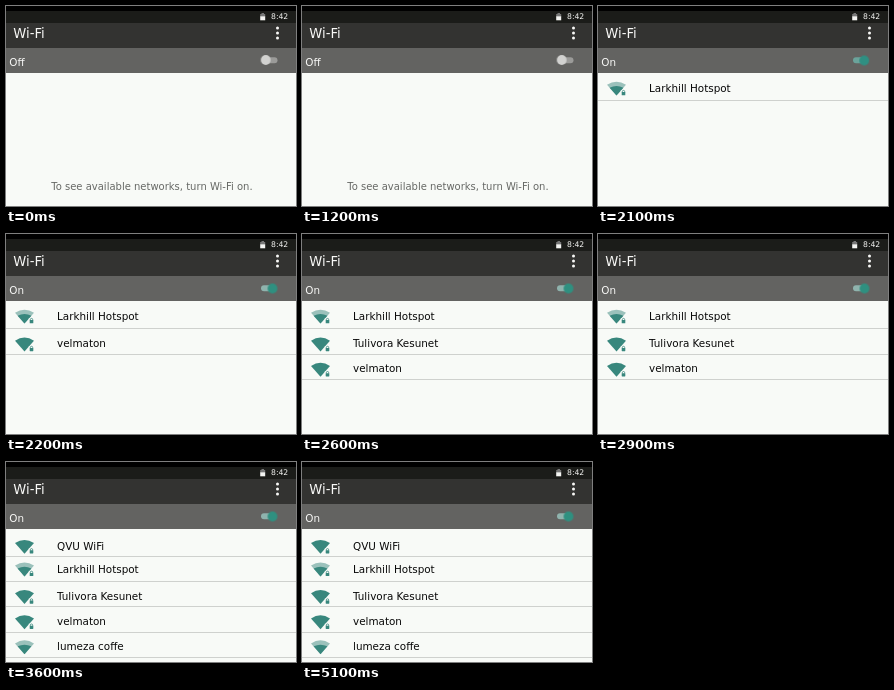
Write an HTML page that moves like this. It is 290 px wide and 200 px high and loops after 6100 ms.

```html
<!DOCTYPE html>
<html lang="en">
<head>
<meta charset="utf-8">
<title>Wi-Fi settings</title>
<style>
  html, body { margin: 0; width: 100%; height: 100%; overflow: hidden; background: #f8faf7; }
  svg { position: absolute; top: 0; left: 0; display: block; }
  text { font-family: "DejaVu Sans", sans-serif; font-size: 10.4px; fill: #080808; }
  .light { fill: #f8f8f6; }

  /* every change is a hard step on one shared 6.1s clock */
  .off, .on, .row, .knob, .track, .rules { animation: 6.1s step-end infinite; }
  .off { animation-name: off; }
  .on { animation-name: on; }
  .knob { animation-name: knob; }
  .track { animation-name: track; }
  .rules { animation-name: rules; }
  .hotspot { animation-name: hotspot; }
  .second { animation-name: second; }
  .pushed { animation-name: pushed; }
  .open { animation-name: open; }
  .top { animation-name: top; }

  .rules {
    --y: 14.4px;
    position: absolute; top: 80px; left: 0; width: 290px; height: 0;
    background: repeating-linear-gradient(#cfd1ce var(--y) calc(var(--y) + 1px),
      transparent calc(var(--y) + 1px) calc(var(--y) + 25.2px));
  }

  @keyframes off { 0% { opacity: 1 } 34.426%, 100% { opacity: 0 } }
  @keyframes on { 0% { opacity: 0 } 34.426%, 100% { opacity: 1 } }
  @keyframes knob {
    0% { transform: translate(259.7px, 54px); fill: #d2d2d0 }
    32.787% { transform: translate(259.7px, 54.2px); fill: #b9d0cb }
    34.426% { transform: translate(266.2px, 54.5px); fill: #2f8f82 }
    36.066%, 100% { transform: translate(266.5px, 54.5px); fill: #2f9080 }
  }
  @keyframes track {
    0% { transform: translateX(5px); fill: #9b9b99 }
    34.426% { transform: none; fill: #6ba39b }
    36.066%, 100% { transform: none; fill: #8fb3ad }
  }
  @keyframes rules {
    0% { height: 0 }
    34.426% { height: 17px }
    36.066% { height: 42px }
    42.623% { height: 67px }
    50.82% { height: 92px }
    59.016%, 100% { height: 117px; --y: 13.95px }
  }
  @keyframes hotspot {
    0% { opacity: 0; transform: translateY(-1.4px) }
    34.426% { opacity: 1; transform: translateY(-1.4px) }
    59.016%, 100% { opacity: 1; transform: translateY(23.4px) }
  }
  @keyframes second {
    0% { opacity: 0; transform: translateY(25.7px) }
    42.623% { opacity: 1; transform: translateY(25.7px) }
    59.016%, 100% { opacity: 1; transform: translateY(50.2px) }
  }
  @keyframes pushed {
    0% { opacity: 0; transform: translateY(25.7px) }
    36.066% { opacity: 1; transform: translateY(25.7px) }
    42.623% { opacity: 1; transform: translateY(50.9px) }
    59.016%, 100% { opacity: 1; transform: translateY(75.4px) }
  }
  @keyframes open {
    0% { opacity: 0; transform: translateY(76px) }
    50.82% { opacity: 1; transform: translateY(76px) }
    59.016%, 100% { opacity: 1; transform: translateY(100.4px) }
  }
  @keyframes top { 0% { opacity: 0 } 59.016%, 100% { opacity: 1 } }
</style>
</head>
<body>
<div class="rules"></div>
<svg width="290" height="200" viewBox="0 0 290 200">
  <defs>
    <path id="fan" d="M9 81Q18.5 74.8 28 81L18.5 91.8Z"/>
    <g id="lock">
      <rect x="22.8" y="86.3" width="5.2" height="6" fill="#f8faf7"/>
      <path d="M24.3 88.6v-.8a1.2 1.2 0 0 1 2.4 0v.8" fill="none" stroke="#38877d" stroke-width=".8"/>
      <rect x="23.7" y="88.3" width="3.6" height="3.2" rx=".4" fill="#38877d"/>
    </g>
    <use id="strong" href="#fan" fill="#38877d"/>
    <g id="weak">
      <use href="#fan" fill="#9bc1bb"/>
      <path d="M11.6 83.9Q18.5 80.6 25.4 83.9L18.5 91.8Z" fill="#38877d"/>
    </g>
  </defs>

  <rect width="290" height="17" fill="#1b1c19"/>
  <rect width="290" height="5" fill="#000"/>
  <rect y="17" width="290" height="25" fill="#333331"/>
  <rect y="42" width="290" height="25" fill="#636361"/>

  <path d="M255.5 7h2.5v1h1.2v2.7h-5V8h1.3z" fill="#777"/>
  <rect x="254.2" y="10.3" width="5" height="4" fill="#f4f4f2"/>
  <text class="light" x="265" y="13.2" style="font-size:7.7px">8:42</text>
  <text class="light" x="7.3" y="32" style="font-size:13.2px">Wi-Fi</text>
  <g class="light">
    <circle cx="271.5" cy="22" r="1.5"/>
    <circle cx="271.5" cy="27" r="1.5"/>
    <circle cx="271.5" cy="32" r="1.5"/>
  </g>

  <text class="light off" x="3.3" y="60">Off</text>
  <text class="light on" x="3.3" y="60">On</text>
  <rect class="track" x="255" y="51.2" width="11.5" height="6" rx="3"/>
  <circle class="knob" r="4.9"/>

  <text class="off" x="45.3" y="184" style="font-size:10px;fill:#666865">To see available networks, turn Wi-Fi on.</text>

  <g class="row top"><use href="#strong"/><use href="#lock"/><text x="51" y="87.5">QVU WiFi</text></g>
  <g class="row hotspot"><use href="#weak" y="-.8"/><use href="#lock" y="-.8"/><text x="51" y="87.8">Larkhill Hotspot</text></g>
  <g class="row second"><use href="#strong"/><use href="#lock"/><text x="51" y="87.5">Tulivora Kesunet</text></g>
  <g class="row pushed"><use href="#strong"/><use href="#lock"/><text x="51" y="87.5">velmaton</text></g>
  <g class="row open"><use href="#weak"/><text x="51" y="87.5">lumeza coffe</text></g>
</svg>
</body>
</html>
```
